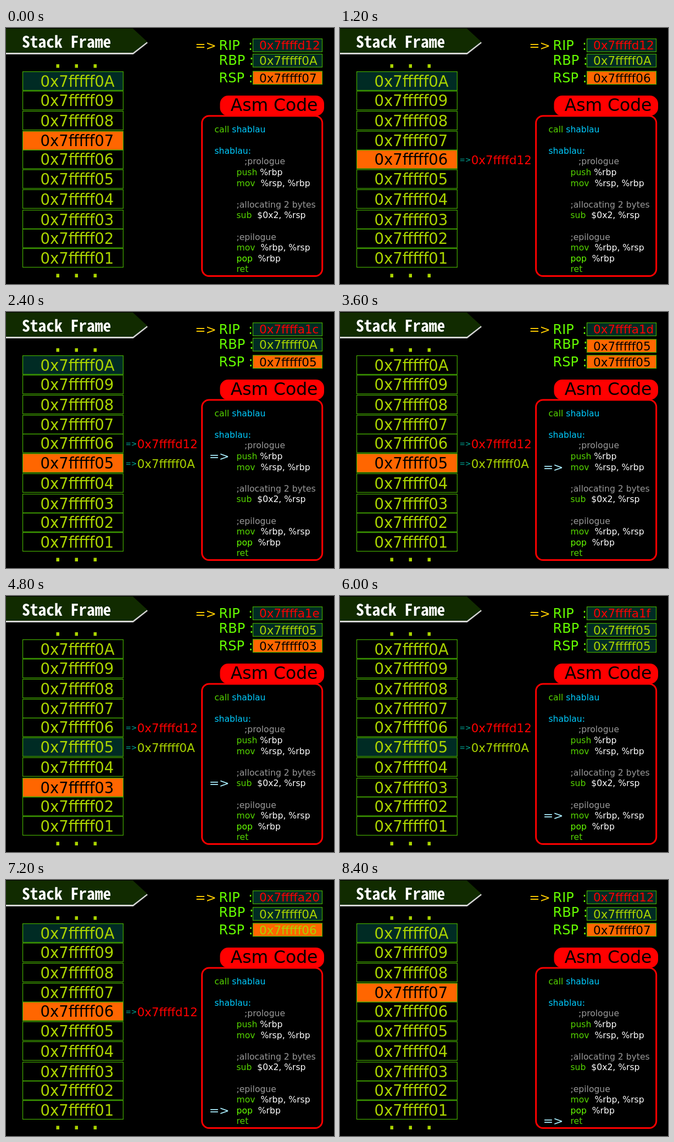
Recreate the animation shown at these times as an HTML page. Size 597 px wide and 466 px high, loop 9600 ms.

```html
<!DOCTYPE html>
<html lang="en">
<head>
<meta charset="utf-8">
<title>Stack Frame</title>
<style>
  html, body { margin: 0; width: 100%; height: 100%; overflow: hidden; background: #000; }
  svg { display: block; width: 597px; height: 466px; }
  text { font-family: "DejaVu Sans", sans-serif; white-space: pre; }
  .title { font: bold 29.5px "Noto Sans Mono CJK JP", "Noto Sans Mono CJK SC", "Noto Sans Mono", monospace; }
</style>
</head>
<body>
<svg viewBox="0 0 597 466">
  <g id="fixed"></g>
  <g id="state"></g>
</svg>
<script>
const STEP = 1200;
const LIME = '#aad400', GREEN = '#55d400', BRIGHT = '#66ff00', EDGE = '#44aa00';
const ORANGE = '#ff6600', TEAL = '#002b24', RED = '#ff0000';
const CYAN = '#00ccff', GRAY = '#999999', WHITE = '#ffffff', BLACK = '#000000';

// Stack cells: last address digit and top edge.
const cells = { A: 79.5, 9: 115, 8: 151.5, 7: 188, 6: 222, 5: 258, 4: 294.3, 3: 331.5, 2: 366, 1: 401.5 };

// line: code line holding the arrow; rbp/rsp: last address digit;
// saved: cells whose contents are shown; rbpY: top of the RBP box.
const states = [
  { rip: 'd12', rbp: 'A', rsp: 7, rbpY: 47.5 },
  { rip: 'd12', rbp: 'A', rsp: 6, rbpY: 47.5, saved: [6] },
  { rip: 'a1c', rbp: 'A', rsp: 5, rbpY: 47.5, saved: [6, 5], line: 4 },
  { rip: 'a1d', rbp: 5, rsp: 5, saved: [6, 5], line: 5, rbpFill: ORANGE },
  { rip: 'a1e', rbp: 5, rsp: 3, saved: [6, 5], line: 8 },
  { rip: 'a1f', rbp: 5, rsp: 5, saved: [6, 5], line: 11, rspFill: TEAL },
  { rip: 'a20', rbp: 'A', rsp: 6, saved: [6], line: 12, rspInk: LIME },
  { rip: 'd12', rbp: 'A', rsp: 7, line: 13 },
];

const code = [
  [379.5, [GREEN, 'call '], [CYAN, 'shablau']],
  [],
  [379.5, [CYAN, 'shablau:']],
  [434, [GRAY, ';prologue']],
  [419.5, [GREEN, 'push '], [WHITE, '%rbp']],
  [419.5, [GREEN, 'mov  '], [WHITE, '%rsp, %rbp']],
  [],
  [419.5, [GRAY, ';allocating 2 bytes']],
  [419.5, [GREEN, 'sub  '], [WHITE, '$0x2, %rsp']],
  [],
  [419.5, [GRAY, ';epilogue']],
  [419.5, [GREEN, 'mov  '], [WHITE, '%rbp, %rsp']],
  [419.5, [BRIGHT, 'pop  '], [WHITE, '%rbp']],
  [419.5, [GREEN, 'ret']],
];
const lineY = i => 189.5 + i * 19.6;

const escapeText = s => s.replace('>', '&gt;');
const text = (x, y, size, fill, s) =>
  `<text x="${x}" y="${y}" font-size="${size}" fill="${fill}">${escapeText(s)}</text>`;
const rect = (x, y, w, h, fill, extra = '') =>
  `<rect x="${x}" y="${y}" width="${w}" height="${h}" fill="${fill}" ${extra}/>`;
const box = (x, y, w, h, fill) => rect(x, y, w, h, fill, `stroke="${EDGE}" stroke-width="1.2"`);
const register = (y, fill, ink, value) =>
  box(449.5, y, 126, 23.7, fill) + text(461, y + 19.7, 21.5, ink, value);
const address = digit => '0x7fffff0' + digit;
const inkOn = fill => fill === ORANGE ? BLACK : LIME;

function drawFixed() {
  const dots = [66, 447.5].flatMap(y => [91.5, 125.5, 159.5].map(x => rect(x, y, 5.5, 6.5, LIME)));
  const lines = code.map(([x, ...parts], i) => parts.length
    ? `<text x="${x}" y="${lineY(i)}" font-size="15.6">` +
      parts.map(([fill, s]) => `<tspan fill="${fill}">${s}</tspan>`).join('') + '</text>'
    : '');
  return [
    '<path d="M0 46.5H231L257 26" fill="none" stroke="#d4d4d4" stroke-width="3"/>',
    '<path d="M0 1H231L257 25L231 45H0Z" fill="#112b00"/>',
    '<text class="title" x="29" y="35.5" fill="#fff">Stack Frame</text>',
    ...dots,
    text(344.2, 39.5, 23, '#ffcc00', '=>'),
    text(387.5, 39.5, 24, BRIGHT, 'RIP  :'),
    text(387.5, 66.5, 24, BRIGHT, 'RBP :'),
    text(387.5, 98.5, 24, BRIGHT, 'RSP :'),
    rect(389.5, 123, 189.5, 37, RED, 'rx="15"'),
    rect(356.7, 160, 219, 291.5, BLACK, `rx="13" stroke="${RED}" stroke-width="3"`),
    text(408.7, 151.3, 31.4, BLACK, 'Asm Code'),
    ...lines,
  ].join('');
}

function drawState({ rip, rbp, rsp, line, saved = [], rbpY = 49.8, rbpFill = TEAL, rspFill = ORANGE, rspInk = inkOn(rspFill) }) {
  const rows = Object.entries(cells).map(([digit, y]) => {
    const fill = digit === String(rsp) ? rspFill : digit === String(rbp) ? TEAL : BLACK;
    return box(30.5, y, 182.8, 34, fill) + text(62.5, y + 27.3, 27.5, inkOn(fill), address(digit));
  });
  const contents = saved.map(digit => {
    const y = cells[digit] + 26.2;
    const [ink, value] = digit === 6 ? [RED, '0x7ffffd12'] : [LIME, address('A')];
    return text(217.6, y - 4, 12.3, '#00b3a1', '=>') + text(238.7, y, 21.4, ink, value);
  });
  return [
    ...rows,
    ...contents,
    register(19.7, TEAL, RED, '0x7ffff' + rip),
    register(rbpY, rbpFill, inkOn(rbpFill), address(rbp)),
    register(78.8, rspFill, rspInk, address(rsp)),
    line ? text(369.7, lineY(line) + 2, 22, '#aaeeff', '=>') : '',
  ].join('');
}

document.getElementById('fixed').innerHTML = drawFixed();
const stateLayer = document.getElementById('state');
const start = performance.now();
let shown = -1;

function render(now) {
  const index = Math.floor(Math.max(0, now - start) / STEP) % states.length;
  if (index !== shown) stateLayer.innerHTML = drawState(states[shown = index]);
  requestAnimationFrame(render);
}
render(start);
</script>
</body>
</html>
```
